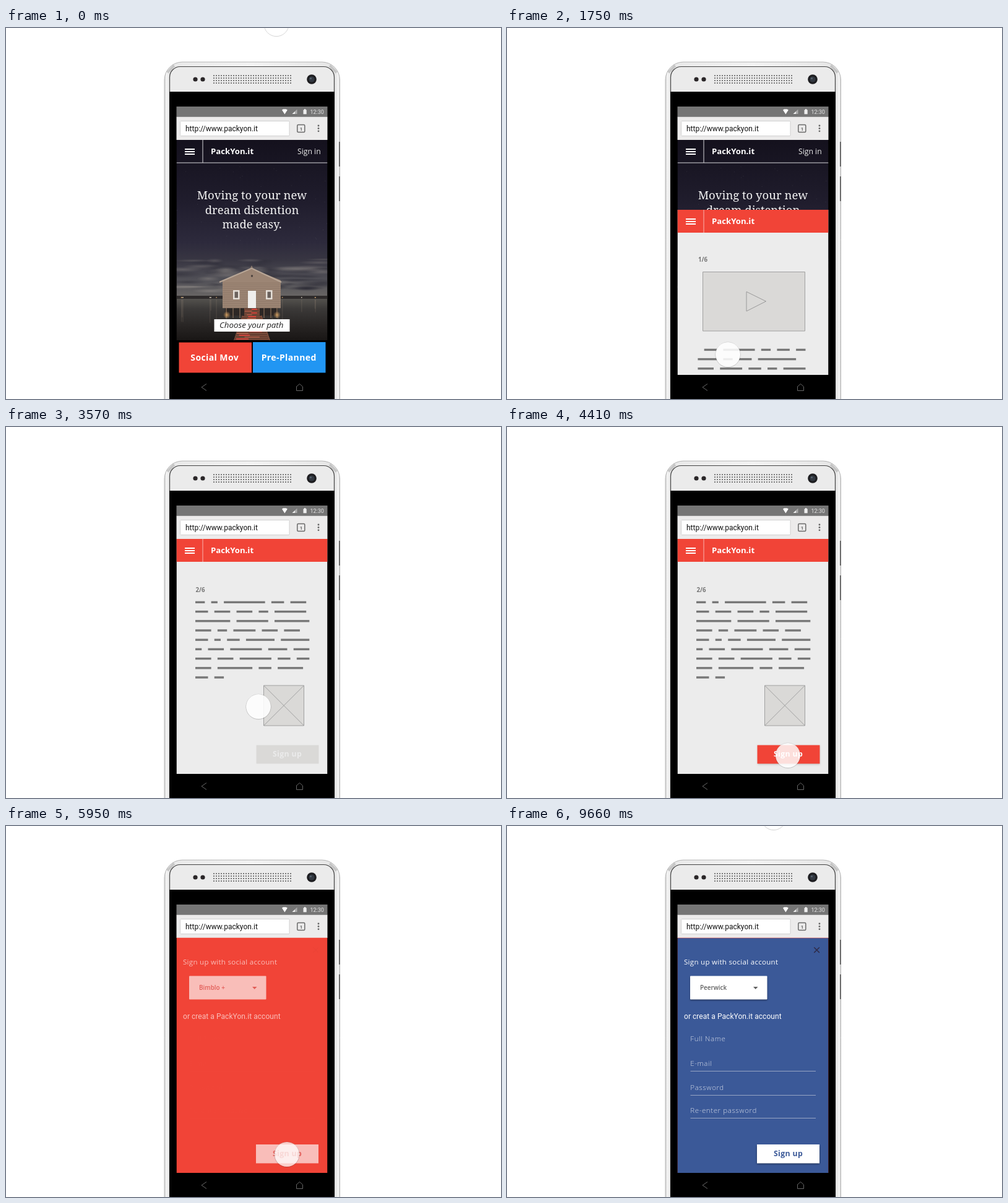
Animation, 800 px wide and 600 px high, one loop 9.8 s. Source, as an HTML page with a canvas:

```html
<!DOCTYPE html>
<html lang="en">
<head>
<meta charset="utf-8">
<title>Moving app sign-up</title>
<style>
html, body { margin: 0; width: 100%; height: 100%; overflow: hidden; background: #fff; }
canvas { display: block; }
</style>
</head>
<body>
<canvas id="stage" width="800" height="600"></canvas>
<script>
const ctx = document.getElementById('stage').getContext('2d');
const LOOP = 9800, STEP = 70;
const RED = '#f14437', BLUE = '#3b5998', PAPER = '#ececec', INK = '#777';
const SANS = '"Open Sans", sans-serif', ROBOTO = 'Roboto, sans-serif';
const BRAND = 'PackYon.it';

const ramp = (t, a, b) => Math.min(1, Math.max(0, (t - a) / (b - a)));
const ease = (t, a, b) => { const u = ramp(t, a, b); return u * u * (3 - 2 * u); };
const mix = (a, b, p) => a + (b - a) * p;
const noise = i => { const v = Math.sin(i * 12.9898) * 43758.5453; return v - Math.floor(v); };

function rect(x, y, w, h, fill) {
  ctx.fillStyle = fill;
  ctx.fillRect(x, y, w, h);
}
function round(x, y, w, h, r, fill, stroke, width = 1) {
  ctx.beginPath();
  ctx.roundRect(x, y, w, h, r);
  if (fill) { ctx.fillStyle = fill; ctx.fill(); }
  if (stroke) { ctx.strokeStyle = stroke; ctx.lineWidth = width; ctx.stroke(); }
}
function disc(x, y, r, fill) {
  ctx.beginPath();
  ctx.arc(x, y, r, 0, 7);
  ctx.fillStyle = fill;
  ctx.fill();
}
function path(points, fill, stroke, width = 1) {
  ctx.beginPath();
  for (let i = 0; i < points.length; i += 2) ctx.lineTo(points[i], points[i + 1]);
  if (fill) { ctx.fillStyle = fill; ctx.fill(); }
  if (stroke) { ctx.strokeStyle = stroke; ctx.lineWidth = width; ctx.stroke(); }
}
function text(str, x, y, font, fill, spacing = 0, align = 'left') {
  ctx.font = font;
  ctx.letterSpacing = spacing + 'px';
  ctx.textAlign = align;
  ctx.fillStyle = fill;
  ctx.fillText(str, x, y);
}
function faded(alpha, draw) {
  if (alpha <= 0) return;
  ctx.save();
  ctx.globalAlpha *= alpha;
  draw();
  ctx.restore();
}
function shadowed(alpha, draw) {
  ctx.save();
  ctx.shadowColor = `rgba(0,0,0,${alpha})`;
  ctx.shadowBlur = 3;
  ctx.shadowOffsetY = 1.5;
  draw();
  ctx.restore();
}
function gradient(x0, y0, x1, y1, stops) {
  const g = ctx.createLinearGradient(x0, y0, x1, y1);
  stops.forEach(([at, color]) => g.addColorStop(at, color));
  return g;
}
function glow(x, y, rx, ry, rgb, alpha) {
  ctx.save();
  ctx.translate(x, y);
  ctx.scale(rx, ry);
  const g = ctx.createRadialGradient(0, 0, 0, 0, 0, 1);
  g.addColorStop(0, `rgba(${rgb},${alpha})`);
  g.addColorStop(1, `rgba(${rgb},0)`);
  disc(0, 0, 1, g);
  ctx.restore();
}

function drawPhone() {
  rect(0, 0, 800, 600, '#fff');
  round(256, 55, 283.5, 600, [29, 29, 0, 0], gradient(256, 0, 540, 0,
    [[0, '#cfcfcf'], [.012, '#f6f6f6'], [.024, '#e9e9e9'], [.5, '#f3f3f3'], [.976, '#e6e6e6'], [.99, '#f6f6f6'], [1, '#c4c4c4']]),
    '#b4b4b4');
  rect(538, 184, 2, 40, '#6a6a6a');
  rect(538, 240, 2, 40, '#6a6a6a');
  for (const [x, y, turn] of [[267, 67, -.8], [528, 67, .8]]) {
    ctx.save();
    ctx.translate(x, y);
    ctx.rotate(turn);
    rect(-8, -3, 16, 4, 'rgba(120,120,120,.3)');
    ctx.restore();
  }
  round(264.5, 62.5, 266, 600, [17, 17, 0, 0], '#ebebeb', '#444', 1.2);
  rect(264, 103, 267, 497, '#000');
  disc(306, 83, 3.6, '#2a2628');
  disc(318, 83, 3.6, '#2a2628');
  for (let x = 336; x <= 460; x += 4) {
    for (let y = 77; y <= 89; y += 4) disc(x, y, 1, '#555');
  }
  disc(494, 83, 7.8, '#1d1d20');
  disc(494, 83, 4.6, '#323841');
  disc(492.5, 81.5, 1.6, '#56616d');
  path([324, 575.5, 316, 581, 324, 586.5], null, '#666');
  path([469.5, 580, 474.5, 575.5, 479.5, 580, 479.5, 586.5, 469.5, 586.5, 469.5, 579.5], null, '#666');
}

function drawBrowserBar() {
  rect(275.5, 127, 244, 16.5, '#757575');
  path([446, 132.5, 448, 131.3, 452.5, 131.3, 454.8, 132.5, 450.4, 139.5], '#fff');
  path([470.5, 131.5, 470.5, 139, 462.5, 139], '#aaa');
  path([467, 135, 467, 139, 462.5, 139], '#eee');
  rect(480.5, 132.3, 5.2, 7, '#eee');
  rect(482, 131, 2.2, 2, '#eee');
  text('12:30', 491.5, 138.7, '9px ' + ROBOTO, '#e4e4e4');
  rect(275.5, 143.5, 244, 37.5, '#ecebeb');
  round(281.5, 150.5, 176.5, 24, 1, '#fff', '#d0d0d0');
  text('http://www.packyon.it', 290, 166.5, '12px ' + ROBOTO, '#111');
  round(470.8, 156.5, 12, 12, 1.5, null, '#6a6a6a', 1.5);
  text('1', 477, 165.5, 'bold 8px ' + ROBOTO, '#666', 0, 'center');
  for (const y of [158, 162.4, 166.8]) disc(505, y, 1.4, '#666');
}

function drawNavigation(rule) {
  for (const y of [195, 199, 203]) rect(289, y, 16, 2, '#fff');
  rect(317.5, 181, 1, 37, rule);
  text(BRAND, 331, 204.3, 'bold 13.2px ' + SANS, '#fff');
}

function drawHouse() {
  path([386, 452, 409, 452, 427, 505, 368, 505], '#7d4e3c');
  for (let i = 0; i < 18; i++) {
    const y = 453 + i * 3, half = 11 + i;
    rect(397 - half, y, half * 2, 1, '#4f3128');
    rect(397 - half * noise(i), y + 1, half * (.5 + .5 * noise(i + 40)), 1.5, i % 2 ? '#c0674f' : '#ff4a42');
  }
  rect(354, 452, 31, 13, '#2d2725');
  rect(410, 452, 30, 13, '#2d2725');
  for (const x of [355, 366, 377, 416, 427, 437]) rect(x, 452, 2, 17, '#655345');
  glow(357, 464, 6, 6, '255,190,110', .7);
  glow(438, 464, 6, 6, '255,190,110', .7);
  path([350, 408, 397, 389, 444, 408, 444, 453, 350, 453], '#9c8574');
  for (let y = 412; y < 453; y += 3) rect(350, y, 94, .7, '#8a7465');
  path([345, 411, 397, 388.5, 445, 411], null, '#b9a797', 2);
  path([395, 388, 397, 384, 399, 388], '#8d7b70');
  rect(396, 399.5, 3, 3, '#4c423e');
  for (const x of [367, 420]) {
    rect(x, 424, 10.5, 15, '#e5dfd8');
    rect(x + 2.5, 426.5, 5.5, 10, '#6b625d');
  }
  rect(391, 425, 13, 28, '#efeeec');
}

function drawHome() {
  rect(275.5, 181, 244, 380, '#000');
  rect(275.5, 181, 244, 256, gradient(0, 181, 0, 437,
    [[0, '#14111d'], [.4, '#201d2d'], [.65, '#2d2a3c'], [.76, '#383642'], [.88, '#504f56'], [1, '#6b6866']]));
  rect(275.5, 437, 244, 68, gradient(0, 437, 0, 505, [[0, '#55534f'], [.25, '#3b3938'], [.65, '#282524'], [1, '#191615']]));
  ctx.save();
  ctx.beginPath();
  ctx.rect(275.5, 181, 244, 324);
  ctx.clip();
  for (let i = 0; i < 70; i++) {
    const depth = noise(i + 300);
    glow(275 + 245 * noise(i + 200), 368 + 60 * depth, 14 + 26 * noise(i + 400), 2 + 4 * noise(i + 500),
      i % 2 ? '150,144,140' : '38,37,48', .25 + .3 * depth);
  }
  for (let i = 0; i < 40; i++) {
    rect(276 + 243 * noise(i), 220 + 130 * noise(i + 80), 1, 1, 'rgba(255,255,255,.1)');
  }
  rect(275.5, 433, 244, 5, '#2e2b2b');
  for (let i = 0; i < 22; i++) {
    const x = 276 + 243 * noise(i + 600);
    rect(x, 435, 1.5, 1.5, i % 2 ? '#c8a070' : '#d8cdbc');
    rect(x, 439, 1.5, 12 + 30 * noise(i + 700), 'rgba(220,195,165,.1)');
  }
  drawHouse();
  ctx.restore();
  drawNavigation('#d8d8dc');
  rect(275.5, 217.5, 244, 1, '#d8d8dc');
  text('Sign in', 471, 204.3, '12.2px ' + SANS, '#eee');
  ['Moving to your new', 'dream distention', 'made easy.'].forEach((line, i) =>
    text(line, 397.5, 277 + i * 23.7, '18.5px "Noto Serif", serif', '#f4f4f4', 0, 'center'));
  rect(336.5, 471, 122, 20, '#fff');
  text('Choose your path', 396.7, 485, 'italic 13.3px ' + SANS, '#222', 0, 'center');
  rect(279.5, 508.5, 117.5, 49, RED);
  rect(399, 508, 117.5, 49.5, '#2196f3');
  text('Social Mov', 337.2, 538, 'bold 14px ' + SANS, '#fff', .4, 'center');
  text('Pre-Planned', 457.2, 538, 'bold 14px ' + SANS, '#fff', .4, 'center');
}

// Placeholder copy: each number is a word length, words are two units apart.
const UNIT = 5.12;
function drawWords(x0, y0, lines, indent = 0) {
  lines.forEach((words, row) => {
    let x = x0 + (row ? 0 : indent);
    for (const n of words) {
      rect(x, y0 + row * 15.2 - 1.8, n * UNIT, 3.4, INK);
      x += (n + 2) * UNIT;
    }
  });
}
const COPY_ONE = [[4, 10, 3, 4, 3], [6, 3, 4, 12], [5, 7, 4, 3, 7], [10, 8, 8, 3], [5, 6, 9, 4, 3], [7]];
const COPY_TWO = [[3, 2, 13, 4, 5], [4, 5, 5, 3, 10], [11, 10, 11], [5, 3, 7, 5, 5], [4, 2, 4, 9, 9],
  [2, 5, 10, 6, 5], [5, 5, 10, 4, 4], [5, 11, 4, 8], [4, 3]];

function drawStepOne() {
  text('1/6', 309, 264.7, 'bold 9.7px ' + SANS, INK);
  round(316.5, 281.5, 165, 95.5, 0, '#dad9d7', '#a0a0a0');
  path([387, 313.5, 418.5, 329, 387, 345, 387, 313.5], null, '#999');
  drawWords(308.4, 407.5, COPY_ONE, 2 * UNIT);
}
function drawStepTwo() {
  text('2/6', 306.5, 266.5, 'bold 9.7px ' + SANS, INK);
  drawWords(306, 283.5, COPY_TWO);
  round(416.5, 418, 65, 65, 0, '#dad9d7', '#a0a0a0');
  path([416.5, 418, 481.5, 483], null, '#a0a0a0');
  path([481.5, 418, 416.5, 483], null, '#a0a0a0');
}

function signUpLabel(y, color) {
  text('Sign up', 454.5, y, 'bold 12.3px ' + SANS, color, .35, 'center');
}

function drawSocialPage(t) {
  const opening = t >= 4970;
  rect(275.5, 181, 244, 380, PAPER);
  rect(275.5, 181, 244, 37, RED);
  drawNavigation('rgba(255,255,255,.6)');
  const second = opening ? 0 : ease(t, 2800, 3220);
  faded(1 - second, drawStepOne);
  faded(second, drawStepTwo);

  const enabled = ramp(t, 3920, 4270);
  if (opening) round(404.5, 514.5, 101, 30, 0, null, 'rgba(120,120,120,.3)');
  else faded(1 - enabled, () => {
    rect(404.5, 514.5, 101, 30, '#dad9d7');
    signUpLabel(533, '#ebebeb');
  });
  faded(opening ? 1 - ramp(t, 4900, 5180) : enabled, () =>
    shadowed(opening ? 0 : .5 * ramp(t, 4270, 4690), () => rect(404.5, 514.5, 101, 30, RED)));
  faded(enabled, () => signUpLabel(533, '#fff'));
}

function drawExpandingSheet(t) {
  const p = ease(t, 4900, 5250);
  const w = 244 * p ** 1.73, h = 380.5 * p ** 2.64;
  const cx = mix(454, 397.5, p), cy = mix(529, 370.75, p);
  round(cx - w / 2, cy - h / 2, w, h, 3 * (1 - p), RED);
}

function drawForm(t) {
  const first = ramp(t, 5390, 6250), rest = ramp(t, 5940, 6440);
  const swap = ramp(t, 7350, 7770), gray = ramp(t, 7350, 7560), blue = ramp(t, 7560, 7770);
  rect(275.5, 180.5, 244, 380.5, RED);
  faded(blue, () => rect(275.5, 181.3, 244, 379.7, BLUE));

  faded(first, () => {
    text('Sign up with social account', 286, 224, '11.5px ' + SANS, '#fff', .3);
    text(`or creat a ${BRAND} account`, 286, 312, '12px ' + ROBOTO, '#fff', .05);
    const tint = `rgb(${mix(214, 95, gray)},${mix(40, 95, gray)},${mix(34, 95, gray)})`;
    const choice = '600 9.9px ' + SANS;
    shadowed(.4 * rest, () => round(296, 242.5, 124.5, 38, 1, '#fff'));
    faded(1 - swap, () => text('Bimblo +', 312, 265, choice, tint));
    faded(swap, () => text('Peerwick', 312, 265, choice, tint));
    path([398, 260, 405.5, 260, 401.7, 264], tint);
    shadowed(.5 * rest, () => rect(404, 515, 101, 30.5, '#fff'));
    signUpLabel(534, blue > .5 ? BLUE : '#d9332c');
  });

  faded(rest, () => {
    const fields = { 'Full Name': 348.3, 'E-mail': 387.8, 'Password': 426.5, 'Re-enter password': 464 };
    for (const [label, y] of Object.entries(fields)) {
      text(label, 296.3, y, '300 11.5px ' + SANS, 'rgba(255,255,255,.8)', .6);
    }
    const line = 'rgba(200,205,220,.65)';
    rect(296.5, 396, 202.5, 1, line);
    faded(blue, () => rect(296.5, 435, 202.5, 1, line));
    rect(296.5, 472, 202.5, 1, line);
    path([496.3, 196.3, 504.9, 204.9], null, '#2f2c4a', 1.5);
    path([504.9, 196.3, 496.3, 204.9], null, '#2f2c4a', 1.5);
  });
}

// Finger strokes: start, end, then cubic Bezier points.
const STROKES = [
  [140, 1050, 437, -7, 568, 120, 297, 420, 357, 528],
  [2170, 3220, 357, 528, 450, 528, 520, 433, 329, 433],
  [3220, 3920, 329, 433, 392.7, 426, 434.3, 458.3, 454, 531],
  [6440, 7000, 454, 531, 460, 420, 400, 300, 361, 246],
  [7140, 7280, 361, 246, 361, 249, 361, 251, 361, 254.5],
  [8750, 9170, 361, 254.5, 460, 200, 484, 80, 435, -15],
  [9240, 9380, 435, -15, 435, -18, 435, -22, 435, -26]
];
function fingerAt(t) {
  if (t >= 9660) return [431, -14];
  const [from, to, ...p] = STROKES.findLast(s => t >= s[0]) || STROKES[0];
  const s = ease(t, from, to), r = 1 - s;
  const along = i => r ** 3 * p[i] + 3 * r * r * s * p[i + 2] + 3 * r * s * s * p[i + 4] + s ** 3 * p[i + 6];
  return [along(0), along(1)];
}
function drawFinger(t) {
  const [x, y] = fingerAt(t);
  ctx.lineWidth = 1;
  for (const [dy, alpha] of [[0, .12], [.7, .12]]) {
    ctx.beginPath();
    ctx.arc(x, y + dy, 20, 0, 7);
    ctx.strokeStyle = `rgba(0,0,0,${alpha})`;
    ctx.stroke();
  }
  disc(x, y, 20, `rgba(255,255,255,${mix(.87, .74, ramp(t, 4270, 4690))})`);
}

function draw(t) {
  drawPhone();
  drawBrowserBar();
  ctx.save();
  ctx.beginPath();
  ctx.rect(275.5, 180.5, 244, 380.5);
  ctx.clip();
  if (t < 1960) drawHome();
  if (t >= 1400 && t < 5250) {
    ctx.save();
    ctx.translate(0, Math.round(380 * (1 - ease(t, 1367, 1967))));
    drawSocialPage(t);
    ctx.restore();
    if (t >= 4970) drawExpandingSheet(t);
  }
  if (t >= 5250) drawForm(t);
  ctx.restore();
  drawFinger(t);
}

const start = performance.now();
function tick() {
  const t = (performance.now() - start) % LOOP;
  draw(Math.floor(t / STEP) * STEP);
  requestAnimationFrame(tick);
}
tick();
</script>
</body>
</html>
```
